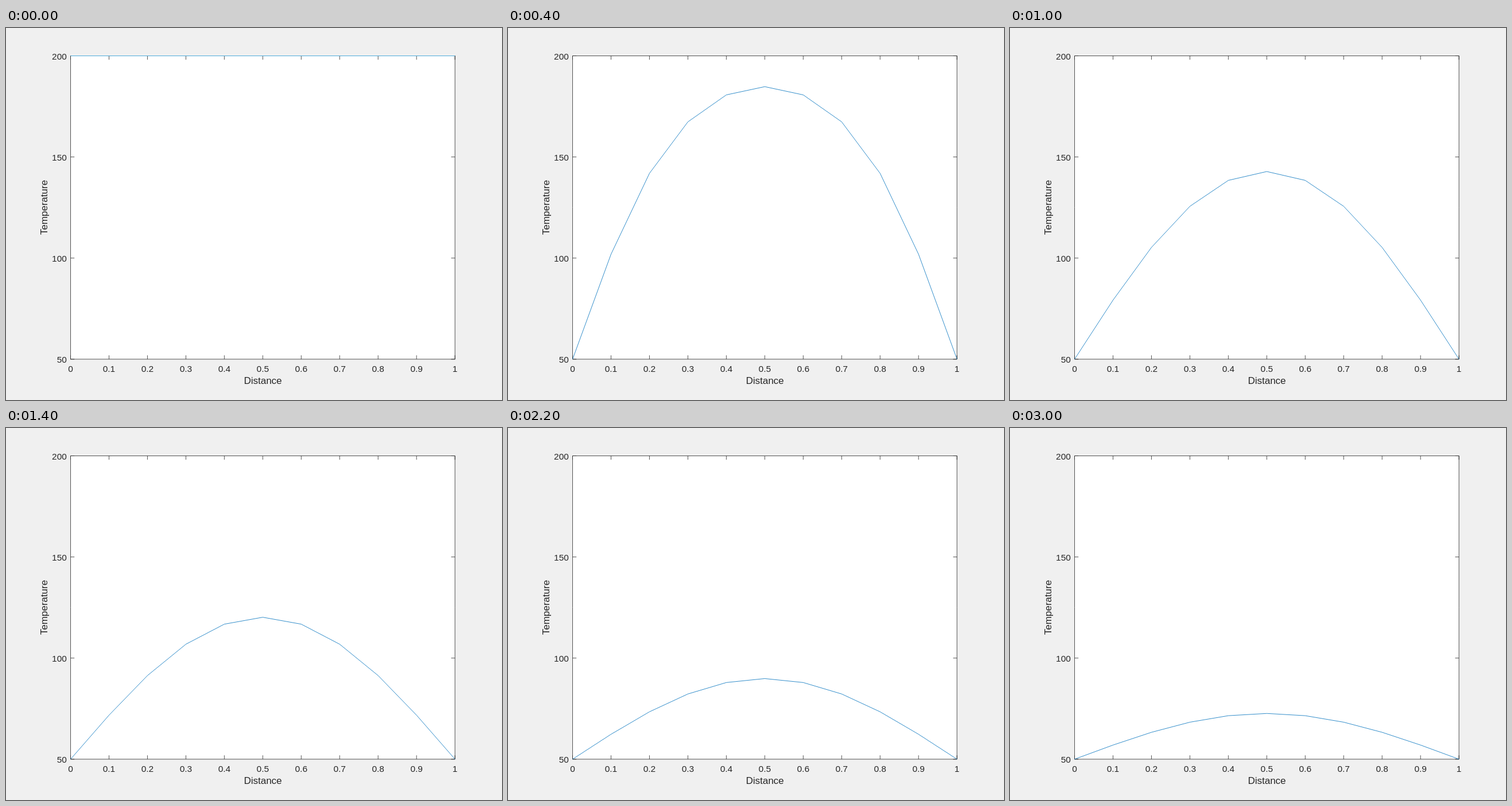
An HTML page with a canvas for the animation above (3100 ms loop, 864 by 648 pixels).

```html
<!DOCTYPE html>
<html lang="en">
<head>
<meta charset="utf-8">
<title>Cooling rod</title>
<style>
  html, body { margin: 0; width: 100%; height: 100%; overflow: hidden; background: #f0f0f0; }
  canvas { display: block; }
</style>
</head>
<body>
<canvas id="stage" width="864" height="648"></canvas>
<script>
const ctx = document.getElementById("stage").getContext("2d");

const LEFT = 112.5, RIGHT = 782.1, TOP = 48.5, BOTTOM = 576.9;
const TICK = 6.7, LINE = 0.8, INK = "#262626";
const FONT = '"Liberation Sans", Arial, sans-serif';
const STEP_MS = 100, STEPS = 31;
const CELLS = 10, EDGE = 50, START = 200, RATIO = 0.75;

const xAt = d => LEFT + (RIGHT - LEFT) * d;
const yAt = temp => BOTTOM - (BOTTOM - TOP) * (temp - 50) / 150;

// Backward-Euler heat equation on a uniform grid, summed over its sine modes.
function temperature(node, step) {
  if (step === 0) return START;
  let sum = 0;
  for (let k = 1; k < CELLS; k += 2) {
    const half = k * Math.PI / (2 * CELLS);
    const weight = 2 / CELLS / Math.tan(half);
    const decay = (1 + 4 * RATIO * Math.sin(half) ** 2) ** -step;
    sum += weight * decay * Math.sin(2 * half * node);
  }
  return EDGE + (START - EDGE) * sum;
}

function segment(x1, y1, x2, y2) {
  ctx.beginPath();
  ctx.moveTo(x1, y1);
  ctx.lineTo(x2, y2);
  ctx.stroke();
}

function label(text, x, y, size, align) {
  ctx.font = `${size}px ${FONT}`;
  ctx.textAlign = align;
  ctx.fillText(text, x, y);
}

function drawAxes() {
  ctx.fillStyle = "#f0f0f0";
  ctx.fillRect(0, 0, 864, 648);
  ctx.fillStyle = "#fff";
  ctx.fillRect(LEFT, TOP, RIGHT - LEFT, BOTTOM - TOP);

  ctx.strokeStyle = ctx.fillStyle = INK;
  ctx.lineWidth = LINE;
  ctx.strokeRect(LEFT, TOP, RIGHT - LEFT, BOTTOM - TOP);

  for (let i = 0; i <= 10; i++) {
    const x = xAt(i / 10);
    segment(x, BOTTOM, x, BOTTOM - TICK);
    segment(x, TOP, x, TOP + TICK);
    label(String(i / 10), x, 598.6, 15.4, "center");
  }
  for (let temp = 50; temp <= 200; temp += 50) {
    const y = yAt(temp);
    segment(LEFT, y, LEFT + TICK, y);
    segment(RIGHT, y, RIGHT - TICK, y);
    label(String(temp), 105.8, y + 6, 15.4, "right");
  }

  label("Distance", 447.5, 620.3, 17, "center");
  ctx.save();
  ctx.translate(72, 312.6);
  ctx.rotate(-Math.PI / 2);
  label("Temperature", 0, 0, 17, "center");
  ctx.restore();
}

function drawCurve(step) {
  if (step === 0) {
    // The flat line lies on the frame and is half clipped by it.
    ctx.fillStyle = "#4dabdb";
    ctx.fillRect(LEFT, 48, RIGHT - LEFT, 1);
    return;
  }
  ctx.strokeStyle = "#0072bd";
  ctx.lineWidth = LINE;
  ctx.lineJoin = "round";
  ctx.beginPath();
  for (let i = 0; i <= CELLS; i++) {
    ctx.lineTo(xAt(i / CELLS), yAt(temperature(i, step)));
  }
  ctx.stroke();
}

function render() {
  const step = Math.floor(performance.now() / STEP_MS) % STEPS;
  drawAxes();
  drawCurve(step);
  requestAnimationFrame(render);
}
render();
</script>
</body>
</html>
```
